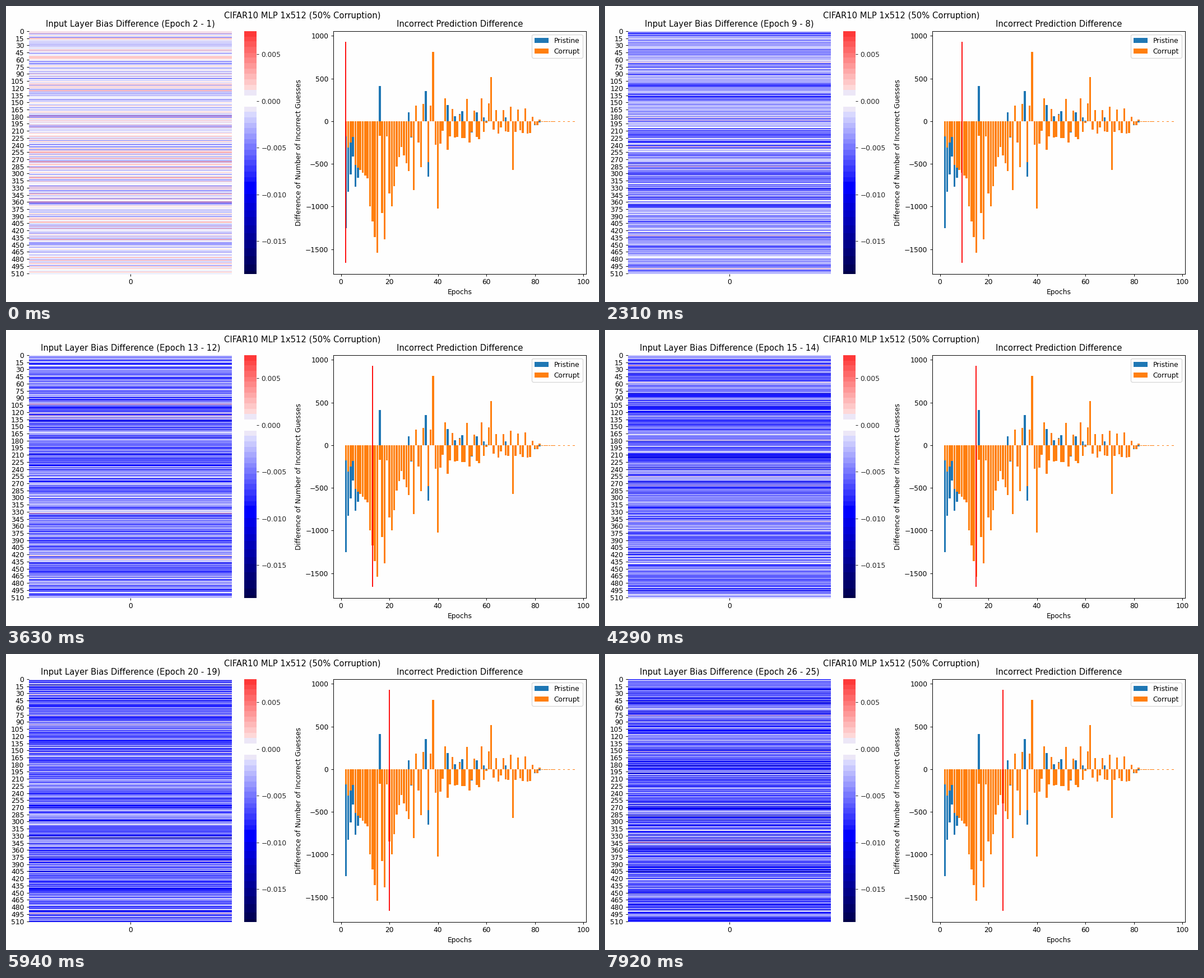
These frames come from a looping animation (1058x529 px, 8 s). A matplotlib script:

```python
import matplotlib.pyplot as plt
import numpy as np
from matplotlib.animation import FuncAnimation
from matplotlib.colors import ListedColormap, Normalize

W, H = 1058, 529
LOOP, STEP, TICK = 8000, 330, 80  # ms: loop, time per epoch, frame interval
FIRST, LAST = 2, 26
ROWS = 512
VMIN, VMAX = -0.0185, 0.0075
TOP, BOTTOM = 44.6, 478.8
PAPER = (254 / 255,) * 3


def stepped_seismic():
    """Seismic colours cut into 16 levels per channel."""
    rgb = np.floor(plt.get_cmap("seismic")(np.arange(256))[:, :3] * 255)
    level = rgb // 16
    out = level * 16 + 7.5
    out[level == 0] = 0
    out[level == 15] = 254
    out[level.min(axis=1) == 14] = (236, 231, 247)
    return ListedColormap(out / 255)


def bias_differences():
    """One column of row values per epoch, drifting from mixed to blue."""
    rng = np.random.default_rng(12)
    z = rng.standard_normal(ROWS)
    table = {}
    for epoch in range(FIRST, LAST + 1):
        mean = -0.0065 * (1 - np.exp((1 - epoch) / 9))
        spread = 0.0022 + 0.0008 * (epoch - FIRST) / (LAST - FIRST)
        table[epoch] = np.clip(mean + spread * z, VMIN, VMAX)
        z = 0.6 * z + 0.8 * rng.standard_normal(ROWS)
    return table


def prediction_differences():
    """Bars per epoch: a deep early dip, then a fading three-epoch swing."""
    rng = np.random.default_rng(5)
    x = np.arange(2, 97)
    swing = np.cos(2 * np.pi * (x - 43) / 3) - 0.2
    reach = np.interp(x, [29, 45, 60, 78, 83], [240, 280, 220, 140, 8])
    corrupt = reach * (swing + 0.25 * rng.standard_normal(x.size))
    pristine = corrupt * rng.uniform(0.2, 1.25, x.size)
    pristine[rng.random(x.size) < 0.12] *= -0.5

    early = x <= 28
    corrupt[early] = np.interp(
        x[early],
        [2, 3, 5, 6, 11, 12, 15, 16, 17, 18, 19, 20, 21, 23, 25, 28],
        [-175, -310, -185, -510, -670, -995, -1542, -170, -1075, -1385, -180,
         -845, -995, -530, -305, -585])
    pristine[early] = np.interp(x[early], [2, 3, 5, 6, 8, 9],
                                [-1255, -830, -415, -770, -560, 0])
    tail = x > 82
    corrupt[tail] = np.where((x < 88) | (x % 2 == 0), -7, 0)[tail]
    pristine[tail] = 0

    for epoch, peak in [(30, -810), (33, -540), (35, 0), (36, -480), (38, 810),
                        (40, -1025), (62, 515), (71, -570)]:
        corrupt[epoch - 2] = peak
        pristine[epoch - 2] = peak / 2
    for epoch, peak in [(16, 412), (28, 105), (35, 350), (36, -650)]:
        pristine[epoch - 2] = peak
    return x, pristine, corrupt


def add_axes(x0, x1):
    """Axes between two pixel columns, sharing one top and bottom."""
    return fig.add_axes([x0 / W, 1 - BOTTOM / H, (x1 - x0) / W,
                         (BOTTOM - TOP) / H], facecolor=PAPER)


plt.rcParams["font.family"] = "DejaVu Sans"
fig = plt.figure(figsize=(12, 6), dpi=W / 12, facecolor=PAPER)
fig.suptitle("CIFAR10 MLP 1x512 (50% Corruption)", y=0.982)
cmap = stepped_seismic()
norm = Normalize(VMIN, -VMIN)
biases = bias_differences()

# Heatmap
heat = add_axes(41, 403)
mesh = heat.pcolormesh([0, 1], np.arange(ROWS + 1), biases[FIRST][:, None],
                       cmap=cmap, norm=norm)
heat.set(xlim=(0, 1), ylim=(ROWS, 0))
heat.set_xticks([0.5], ["0"])
labels = np.arange(0, ROWS, 15)
heat.set_yticks(labels + 0.5, [str(n) for n in labels])
heat.spines[:].set_visible(False)
title = heat.set_title("")

# Colour bar
bar = add_axes(425, 447)
edges = np.linspace(VMIN, VMAX, 257)
bar.pcolormesh([0, 1], edges, ((edges[1:] + edges[:-1]) / 2)[:, None],
               cmap=cmap, norm=norm)
bar.set(xlim=(0, 1), ylim=(VMIN, VMAX), xticks=[])
marks = np.arange(-3, 2) * 0.005
bar.set_yticks(marks, [f"{m:.3f}".replace("-", "\u2212") for m in marks])
bar.yaxis.tick_right()
bar.tick_params(axis="y", color="0.15", labelcolor="0.15")
bar.spines[:].set_visible(False)

# Bar chart
chart = add_axes(584, 1035)
epochs, pristine, corrupt = prediction_differences()
chart.bar(epochs, pristine, color="C0", label="Pristine")
chart.bar(epochs, corrupt, color="C1", label="Corrupt")
pad = 0.05 * np.ptp(corrupt)
low, high = corrupt.min() - pad, corrupt.max() + pad
cursor, = chart.plot([FIRST] * 2, [low, high], color="red", lw=1.5,
                     solid_capstyle="butt", zorder=3)
margin = 0.05 * (high - low)
chart.set(xlim=(-3.14, 101.14), ylim=(low - margin, high + margin),
          xticks=range(0, 101, 20), yticks=range(-1500, 1001, 500),
          xlabel="Epochs", ylabel="Difference of Number of Incorrect Guesses",
          title="Incorrect Prediction Difference")
chart.legend(loc="upper right")


def update(i):
    epoch = min(FIRST + (i * TICK + TICK - 1) // STEP, LAST)
    mesh.set_array(biases[epoch][:, None])
    title.set_text(f"Input Layer Bias Difference (Epoch {epoch} - {epoch - 1})")
    cursor.set_xdata([epoch, epoch])
    return mesh, title, cursor


anim = FuncAnimation(fig, update, frames=LOOP // TICK, interval=TICK,
                     repeat=True, repeat_delay=0)
plt.show()
```
